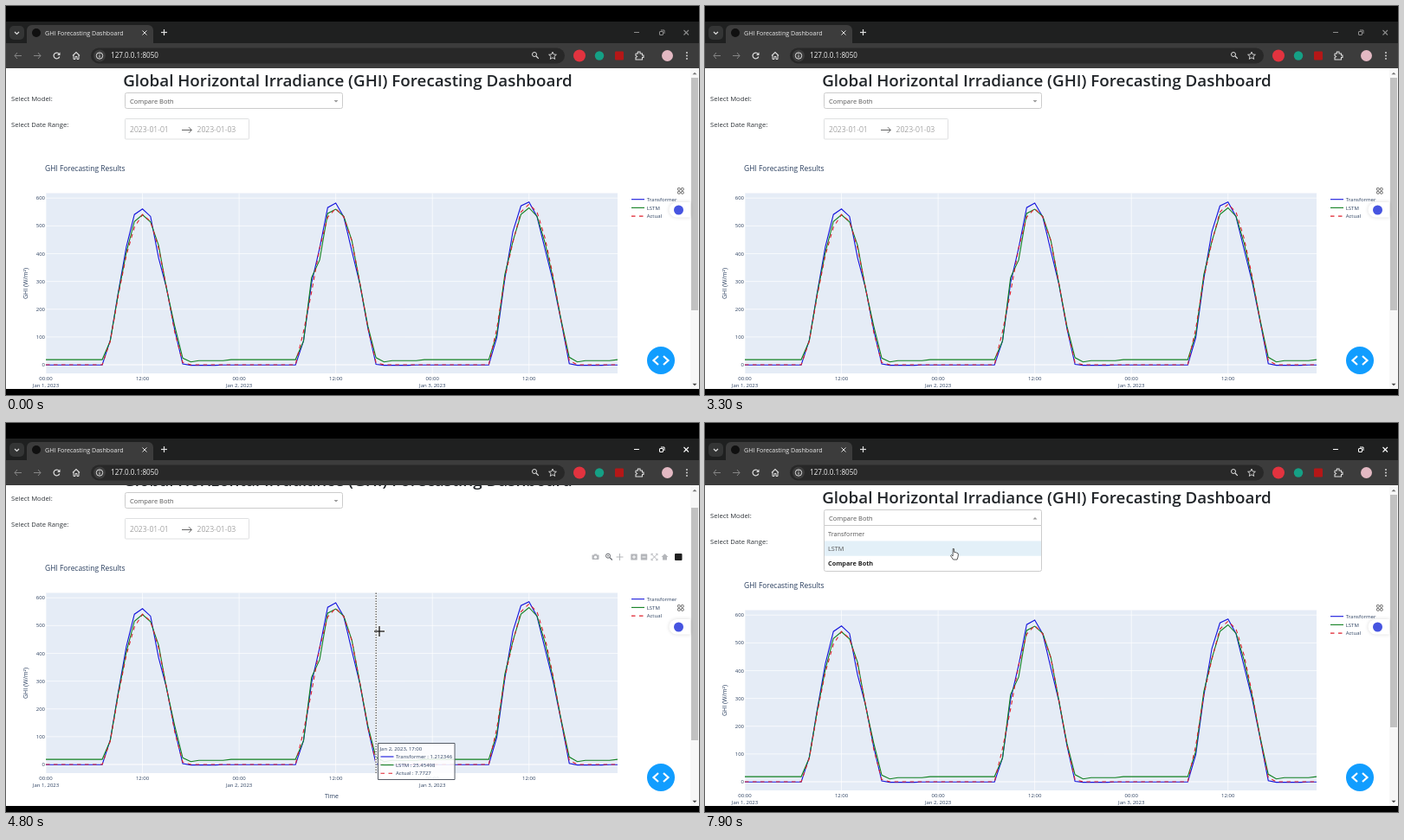
Write an HTML page with a canvas that moves like this. It is 800x450 px and loops after 8000 ms.

```html
<!DOCTYPE html>
<html lang="en">
<head>
<meta charset="utf-8">
<title>GHI Forecasting Dashboard</title>
<style>
html, body { margin: 0; width: 100%; height: 100%; overflow: hidden; background: #000; }
canvas { display: block; width: 800px; height: 450px; }
</style>
</head>
<body>
<canvas id="stage" width="800" height="450"></canvas>
<script>
const ctx = document.getElementById('stage').getContext('2d');
const LOOP = 8000, STEP = 100;
const INK = '#2a3f5f';
const PLOT = { left: 46, right: 706, top: 216.5, bottom: 425, hour: 9.296, zero: 415, unit: 0.3213 };

// Values for 08:00 to 17:00 of each day; the other hours follow the night rules.
const series = [
  { name: 'Transformer', color: '#1414dc', dash: [], night: h => h > 17 && h < 22 ? -2 : -0.6158974, days: [
    [88, 262, 425, 541, 561, 534, 385, 274, 125, 3],
    [86, 295, 420, 566, 582, 532, 410, 290, 130, 1.212346],
    [98, 310, 480, 572, 586, 533, 415, 298, 155, 4]] },
  { name: 'LSTM', color: '#108020', dash: [], night: h => h < 8 || h > 22 ? 18.39435 : h === 18 ? 10 : 15, days: [
    [86, 257, 405, 516, 540, 514, 430, 272, 140, 24],
    [85, 314, 377, 545, 560, 534, 448, 292, 138, 25.45498],
    [110, 325, 445, 541, 565, 534, 438, 310, 160, 27]] },
  { name: 'Actual', color: '#e0202c', dash: [4.5, 4.5], night: () => 0, days: [
    [84, 250, 395, 495, 541, 516, 420, 276, 118, 8],
    [120, 262, 420, 531, 563, 532, 446, 294, 132, 7.7727],
    [130, 312, 442, 550, 578, 550, 455, 318, 155, 15]] }
];
const valueAt = (s, i) => {
  const h = i % 24;
  return h < 8 || h > 17 ? s.night(h) : s.days[Math.floor(i / 24)][h - 8];
};
const hourX = i => PLOT.left + i * PLOT.hour;
const valueY = v => PLOT.zero - v * PLOT.unit;

// Keys: [time, value, value, ...], eased between neighbours.
function track(keys, t) {
  if (t <= keys[0][0]) return keys[0].slice(1);
  for (let i = 1; i < keys.length; i++) {
    const a = keys[i - 1], b = keys[i];
    if (t <= b[0]) {
      const u = (t - a[0]) / (b[0] - a[0]), e = u * u * (3 - 2 * u);
      return a.slice(1).map((v, k) => v + (b[k + 1] - v) * e);
    }
  }
  return keys[keys.length - 1].slice(1);
}
const scrollKeys = [[4200, 0], [4300, 4], [4400, 12], [4600, 20], [4900, 20], [5300, 0]];
const mouseKeys = [[3700, 424, 390], [4100, 431, 241], [5100, 431, 241], [5700, 547, 232],
  [6000, 530, 226], [6600, 350, 160], [7000, 290, 110], [7400, 290, 112], [7800, 288, 151]];
const FOCUS = 3800, ENTER = 3700, OPEN = 7200;

function text(str, x, y, size, color = INK, align = 'left', weight = 400) {
  ctx.font = `${weight} ${size}px "Open Sans", "Noto Sans", sans-serif`;
  ctx.fillStyle = color;
  ctx.textAlign = align;
  ctx.fillText(str, x, y + size * 0.357);
}
function rect(x, y, w, h, fill, radius = 0, stroke) {
  ctx.beginPath();
  ctx.roundRect(x, y, w, h, radius);
  if (fill) { ctx.fillStyle = fill; ctx.fill(); }
  if (stroke) { ctx.strokeStyle = stroke; ctx.lineWidth = 1; ctx.stroke(); }
}
function disc(x, y, r, fill) {
  ctx.beginPath();
  ctx.arc(x, y, r, 0, 7);
  ctx.fillStyle = fill;
  ctx.fill();
}
function line(points, color, width = 1, dash = []) {
  ctx.beginPath();
  for (let i = 0; i < points.length; i += 2) ctx.lineTo(points[i], points[i + 1]);
  ctx.strokeStyle = color;
  ctx.lineWidth = width;
  ctx.setLineDash(dash);
  ctx.stroke();
  ctx.setLineDash([]);
}
function arc(x, y, r, from, to, color, width = 1) {
  ctx.beginPath();
  ctx.arc(x, y, r, from, to);
  ctx.strokeStyle = color;
  ctx.lineWidth = width;
  ctx.stroke();
}
function shape(points, fill, stroke) {
  ctx.beginPath();
  for (let i = 0; i < points.length; i += 2) ctx.lineTo(points[i], points[i + 1]);
  ctx.closePath();
  ctx.fillStyle = fill;
  ctx.fill();
  if (stroke) { ctx.strokeStyle = stroke; ctx.lineWidth = 0.8; ctx.stroke(); }
}
function triangle(x, y, dir, color, r = 2.5) {
  shape([x - r, y - dir * r / 2, x + r, y - dir * r / 2, x, y + dir * r / 2], color);
}
function magnifier(x, y, color) {
  arc(x - 1, y - 1, 2.5, 0, 7, color);
  line([x + 1, y + 1, x + 3.8, y + 3.8], color, 1.2);
}
function house(x, y, r, color) {
  line([x - r, y, x, y - r, x + r, y], color, 1.1);
  line([x - r + 1, y - 0.5, x - r + 1, y + r, x - 1, y + r, x - 1, y + 1, x + 1, y + 1,
    x + 1, y + r, x + r - 1, y + r, x + r - 1, y - 0.5], color);
}
function navArrow(x, y, dir) {
  line([x - 4 * dir, y, x + 4 * dir, y], '#858585');
  line([x + dir, y - 3.5, x + 4 * dir, y, x + dir, y + 3.5], '#858585');
}

function drawBrowser(focused) {
  const pale = '#dedede', control = focused ? '#fff' : '#8c8c8c';
  rect(0, 0, 800, 18, '#000');
  rect(0, 18, 800, 26, '#1f2020');
  rect(0, 43, 800, 29, '#3c3c3c');
  rect(0, 443, 800, 7, '#000');

  rect(4, 23, 17, 16, '#343535', 5);
  line([10, 30, 12.5, 32.5, 15, 30], pale, 1.2);
  rect(24, 22, 146, 25, '#3c3c3c', [6, 6, 0, 0]);
  disc(35, 31, 5, '#101010');
  text('GHI Forecasting Dashboard', 45, 31, 7.1, '#e8e8e8');
  line([157.5, 28.5, 162.5, 33.5], pale);
  line([162.5, 28.5, 157.5, 33.5], pale);
  line([179, 30.5, 186, 30.5], pale, 1.2);
  line([182.5, 27, 182.5, 34], pale, 1.2);

  line([725, 30.5, 731, 30.5], control);
  rect(754.5, 29.5, 4, 4, null, 0.5, control);
  line([756, 28, 760, 28, 760, 32], control);
  line([782.5, 28, 788, 33.5], control, 1.1);
  line([788, 28, 782.5, 33.5], control, 1.1);

  navArrow(14, 57.5, -1);
  navArrow(36, 57.5, 1);
  arc(58.5, 57.5, 3.4, 0.3, 5.6, pale, 1.2);
  shape([62.5, 53.5, 62.5, 57, 59, 57], pale);
  house(81, 57.5, 4, pale);

  rect(98, 48.5, 547, 18, '#282828', 9);
  disc(108, 57.5, 7, '#3c3c3c');
  arc(108, 57.5, 3.7, 0, 7, pale);
  line([108, 57, 108, 59.6], pale);
  line([108, 55.2, 108, 56.1], pale);
  text('127.0.0.1:8050', 121, 57.5, 8.1, '#f0f0f0');
  magnifier(611, 57, pale);
  const star = [];
  for (let i = 0; i < 11; i++) {
    const r = i % 2 ? 2.1 : 4.6, a = i * Math.PI / 5 - Math.PI / 2;
    star.push(631 + r * Math.cos(a), 57.7 + r * Math.sin(a));
  }
  line(star, pale, 0.9);

  disc(662, 57.5, 7, '#e2333f');
  disc(685, 57.5, 5.2, '#15a085');
  rect(703, 52.5, 10, 10, '#b51717', 1);
  line([727, 55, 729.4, 55, 729.4, 53, 732, 53, 732, 55, 734.5, 55, 734.5, 57, 736, 57, 736, 59.5,
    734.5, 59.5, 734.5, 62, 727, 62, 727, 59.5, 728.5, 58.5, 727, 57.5, 727, 55], pale, 1.1);
  disc(763.5, 57.5, 6.5, '#e3b9c3');
  [54, 57.5, 61].forEach(y => disc(786, y, 0.9, pale));
}

function drawControls(open) {
  text('Global Horizontal Irradiance (GHI) Forecasting Dashboard', 394.5, 86, 18.8, '#212529', 'center', 600);
  text('Select Model:', 6, 107, 7.7, '#30353a');
  text('Select Date Range:', 6, 137, 7.7, '#30353a');

  rect(137.5, 100.5, 251, 18, '#fff', open ? [2, 2, 0, 0] : 2, '#cccccc');
  text('Compare Both', 143, 110, 7.5, '#555');
  triangle(381, 110.2, open ? -1 : 1, '#999');

  rect(137.5, 130.5, 143, 23.5, '#fff', 1, '#dfe0e1');
  text('2023-01-01', 143, 142.7, 8.6, '#757575', 'left', 300);
  text('2023-01-03', 220.5, 142.7, 8.6, '#757575', 'left', 300);
  line([203, 143.5, 214, 143.5], '#555', 0.9);
  line([211, 140.2, 214.3, 143.5, 211, 146.8], '#555', 0.9);
}

function drawMenu(mouse) {
  rect(137.5, 118.5, 251, 53, '#fff', [0, 0, 2, 2], '#cccccc');
  const over = mouse[1] < 119 ? 2 : Math.min(2, Math.floor((mouse[1] - 119) / 17.4));
  rect(138, 119 + over * 17.4, 250, 17.4, '#e3f0f8');
  ['Transformer', 'LSTM', 'Compare Both'].forEach((name, i) =>
    text(name, 142, 128 + i * 17.4, 7.3, i === 2 ? '#222' : '#555', 'left', i === 2 ? 700 : 400));
}

function drawChart() {
  text('GHI Forecasting Results', 45, 188.3, 8.45);
  rect(PLOT.left, PLOT.top, PLOT.right - PLOT.left, PLOT.bottom - PLOT.top, '#e5ecf6');

  for (let v = 0; v <= 600; v += 100) {
    const y = valueY(v);
    line([PLOT.left, y, PLOT.right, y], '#fff', v ? 0.7 : 1.2);
    text(String(v), 45, y, 6, INK, 'right');
  }
  for (let i = 0; i < 72; i += 12) {
    const x = hourX(i);
    line([x, PLOT.top, x, PLOT.bottom], '#fff', 0.7);
    text(i % 24 ? '12:00' : '00:00', x, 431, 6, INK, 'center');
    if (i % 24 === 0) text(`Jan ${i / 24 + 1}, 2023`, x, 438.7, 6, INK, 'center');
  }
  ctx.save();
  ctx.translate(23, 321);
  ctx.rotate(-Math.PI / 2);
  text('GHI (W/m²)', 0, 0, 7, INK, 'center');
  ctx.restore();
  text('Time', 376, 452, 7, INK, 'center');

  series.forEach((s, k) => {
    const points = [];
    for (let i = 0; i < 72; i++) points.push(hourX(i), valueY(valueAt(s, i)));
    line(points, s.color, 1.1, s.dash);
    const y = 223.7 + k * 9.7;
    line([722, y, 737, y], s.color, 1.1, s.dash);
    text(s.name, 739.7, y, 6);
  });
}

function drawModebar() {
  const c = '#b4b6ba', y = 175;
  rect(676.5, y - 2.5, 8, 5.5, c, 1);
  rect(679, y - 3.5, 3, 2, c);
  disc(680.5, y + 0.2, 1.6, '#fff');
  magnifier(696, y - 0.3, '#62656b');
  line([694, y - 1.3, 696, y - 1.3], '#62656b');
  line([704.5, y, 712.5, y], c);
  line([708.5, y - 4, 708.5, y + 4], c);
  [725, 736.5].forEach((x, i) => {
    rect(x - 3.7, y - 3.5, 7.4, 7, c, 0.5);
    line([x - 2, y, x + 2, y], '#fff');
    if (!i) line([x, y - 2, x, y + 2], '#fff');
  });
  line([745, y - 3.5, 752, y + 3.5], c);
  line([752, y - 3.5, 745, y + 3.5], c);
  [[745, -1], [752, 1]].forEach(([x, d]) => [-1, 1].forEach(e =>
    line([x - 2 * d, y + 3.7 * e, x, y + 3.7 * e, x, y + 1.7 * e], c, 0.8)));
  shape([756.5, y, 760.5, y - 3.7, 764.5, y, 763, y, 763, y + 3.5, 758, y + 3.5, 758, y], c);
  rect(772, y - 4, 8.5, 8, '#202020', 1);
}

function drawHover(i) {
  const x = hourX(i), values = series.map(s => valueAt(s, i));
  line([x, PLOT.top, x, PLOT.bottom], '#fff', 2);
  line([x, PLOT.top, x, PLOT.bottom], '#222', 1, [1.5, 1.5]);

  const rows = series.map((s, k) => `${s.name} : ${String(values[k]).replace('-', '−')}`);
  ctx.font = '6px "Open Sans", "Noto Sans", sans-serif';
  const widest = Math.max(...rows.map(r => ctx.measureText(r).width));
  const left = Math.round(x) + 2.5;
  const top = Math.round(valueY(values.reduce((a, b) => a + b) / 3) - 21) + 0.5;
  rect(left, top, widest + 23.5, 42, 'rgba(255,255,255,0.87)', 0, '#555b66');
  const hour = String(i % 24).padStart(2, '0');
  text(`Jan ${Math.floor(i / 24) + 1}, 2023, ${hour}:00`, left + 2, top + 6, 6);
  rows.forEach((row, k) => {
    const y = top + 15.5 + k * 9.6;
    line([left + 3, y, left + 18, y], series[k].color, 1.1, series[k].dash);
    text(row, left + 20.5, y, 6);
  });
}

function drawOverlays(scroll) {
  rect(790, 72, 10, 371, '#f7f7f7');
  rect(791, 83 + scroll * 0.75, 8, 269, '#c1c1c1');
  triangle(795, 78, -1, '#777');
  triangle(795, 438, 1, '#444');

  ctx.save();
  ctx.shadowColor = 'rgba(0,0,0,0.15)';
  ctx.shadowBlur = 4;
  rect(765.5, 227, 24.5, 17.5, '#fff', [9, 0, 0, 9]);
  ctx.restore();
  rect(773.5, 206, 16, 16, '#fff', [3, 0, 0, 3]);
  [775.5, 779.5].forEach(x => [210.5, 214.5].forEach(y => rect(x, y, 2.7, 2.7, null, 0.7, '#666')));
  disc(776.5, 236, 5.5, '#4654e0');

  disc(756, 410, 16, '#119dff');
  line([753, 405, 747.5, 410, 753, 415], '#fff', 2.2);
  line([759, 405, 764.5, 410, 759, 415], '#fff', 2.2);
}

function drawCursor(x, y, kind) {
  ctx.save();
  ctx.translate(x, y);
  if (kind === 'cross') {
    line([-6.5, 0, 6.5, 0], '#fff', 2.4);
    line([0, -6.5, 0, 6.5], '#fff', 2.4);
    line([-6, 0, 6, 0], '#111', 1.3);
    line([0, -6, 0, 6], '#111', 1.3);
  } else if (kind === 'hand') {
    shape([-1.8, -5.5, -0.6, -5.5, -0.3, -1.5, 1.2, -1.5, 2.6, -0.8, 4, -0.2, 4.4, 1, 4, 4, 3, 7,
      -1.5, 7, -4.5, 2.5, -3.6, 1.6, -1.9, 3], '#fff', '#333');
  } else {
    shape([0, 0, 0, 10.5, 2.5, 8.2, 4.2, 12, 5.8, 11.3, 4.1, 7.6, 7.4, 7.4], '#fff', '#222');
  }
  ctx.restore();
}

function draw(t) {
  const scroll = track(scrollKeys, t)[0];
  const mouse = track(mouseKeys, t);
  const pageY = mouse[1] + scroll;
  const present = t >= ENTER, open = t >= OPEN;
  const inPlot = present && pageY > PLOT.top && pageY < PLOT.bottom;

  rect(0, 72, 800, 371, '#fff');
  ctx.save();
  ctx.beginPath();
  ctx.rect(0, 72, 790, 371);
  ctx.clip();
  ctx.translate(0, -scroll);
  drawControls(open);
  drawChart();
  if (present && pageY > 160) drawModebar();
  if (inPlot) drawHover(Math.round((mouse[0] - PLOT.left) / PLOT.hour));
  if (open) drawMenu(mouse);
  ctx.restore();

  drawOverlays(scroll);
  drawBrowser(t >= FOCUS);
  if (present) drawCursor(mouse[0], mouse[1], inPlot ? 'cross' : open && mouse[1] > 119 ? 'hand' : 'arrow');
}

function frame(now) {
  draw(Math.floor(now % LOOP / STEP) * STEP);
  requestAnimationFrame(frame);
}
requestAnimationFrame(frame);
</script>
</body>
</html>
```
